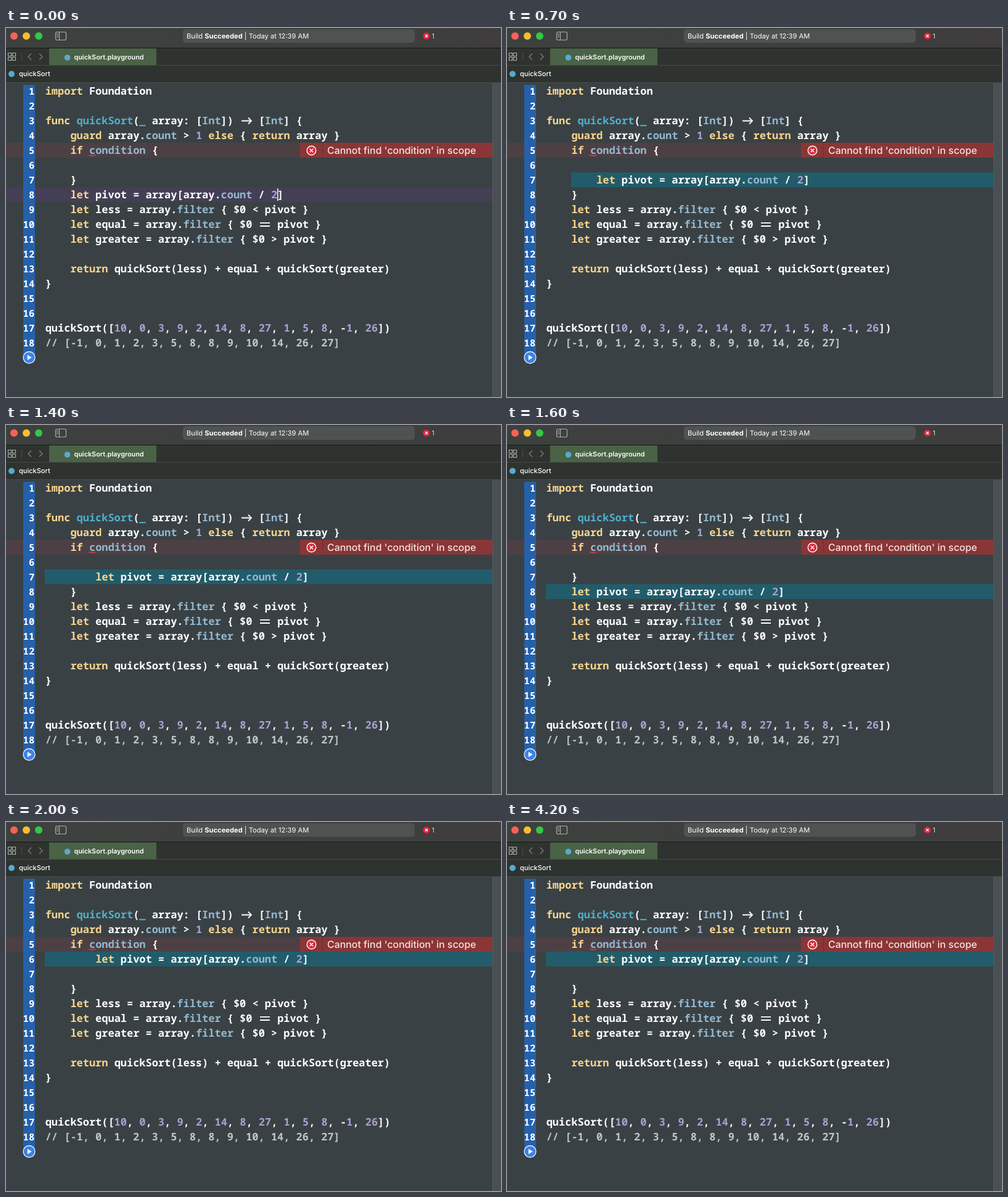
Animation, 803 px wide and 598 px high, one loop 4300 ms. Source, as an HTML page:

```html
<!DOCTYPE html>
<html lang="en">
<head>
<meta charset="utf-8">
<title>Moving a line of code</title>
<style>
  html, body { margin: 0; width: 100%; height: 100%; overflow: hidden; background: #3a4144; }
  svg { display: block; width: 803px; height: 598px; }
  text { fill: #fff; white-space: pre; text-rendering: geometricPrecision; font-family: Inter, sans-serif; }
  .code text { font: 600 16.97px "Noto Sans Mono", monospace; }
  .code .num { font-size: 15.5px; font-weight: 700; text-anchor: end; }
  .code .key { fill: #f8d58f; }
  .code .decl { fill: #4fb0cc; }
  .code .member { fill: #93b9d0; }
  .code .digit { fill: #a9a0d0; }
  .code .comment { fill: #bfc5c9; }
  .line { fill: none; stroke: #a9aca9; stroke-width: 1.2; }
</style>
</head>
<body>
<svg viewBox="0 0 803 598">
  <defs>
    <linearGradient id="bar">
      <stop offset="0" stop-color="#3d413e"/>
      <stop offset="1" stop-color="#3f3d3e"/>
    </linearGradient>
  </defs>

  <rect width="803" height="598" fill="#3a4144"/>
  <rect width="803" height="32" fill="url(#bar)"/>
  <rect y="32" width="803" height="1" fill="#151816"/>
  <rect y="33" width="803" height="55" fill="#2e332f"/>
  <rect y="60" width="803" height="1" fill="#454a46"/>
  <rect y="88" width="803" height="1" fill="#484e4b"/>
  <rect x="70" y="33" width="174" height="27" fill="#4a6245"/>

  <circle cx="13" cy="13" r="6" fill="#f8605a"/>
  <circle cx="33" cy="13" r="6" fill="#fabd2f"/>
  <circle cx="53" cy="13" r="6" fill="#33c748"/>
  <g class="line">
    <rect x="80.5" y="6.5" width="17" height="13" rx="2.5"/>
    <path d="M86.5 6.5v13M82 9.5h3M82 12h3M82 14.5h3"/>
    <path d="M3.5 40.5h5v5h-5zM10.5 40.5h5v5h-5zM3.5 47.5h5v5h-5zM10.5 47.5h5v5h-5z"/>
    <path d="M41 41.5l-5 5 5 5M54 41.5l5 5-5 5" stroke="#7d827e"/>
    <path d="M25.5 40v13" stroke="#484d49"/>
  </g>

  <rect x="287" y="2" width="376" height="22" rx="5" fill="#4e5251"/>
  <text x="293" y="17" font-size="11.17">Build <tspan font-weight="700">Succeeded</tspan> | Today at 12:39 AM</text>
  <circle cx="682" cy="13" r="5.6" fill="#e0263c"/>
  <path d="M680 11l4 4m0-4l-4 4" stroke="#fff" stroke-width="1.2"/>
  <text x="690.5" y="17" font-size="11" style="fill:#d6d7d6">1</text>

  <circle cx="99.5" cy="48" r="4.8" fill="#58a9d2"/>
  <text x="110.5" y="51" font-size="10.8" font-weight="600">quickSort.playground</text>
  <circle cx="9" cy="74.5" r="5" fill="#58a9d2"/>
  <text x="21" y="78" font-size="11" font-weight="500">quickSort</text>

  <rect id="current" y="258" width="789" height="24" fill="#443f55"/>
  <rect id="selection" height="24" fill="#225c6a"/>
  <rect y="186" width="477" height="24" fill="#4c4045"/>
  <rect x="477" y="186" width="312" height="24" fill="#8b3536"/>
  <path d="M513.5 186v24" stroke="#6b3033"/>
  <circle cx="495.5" cy="198.5" r="7.3" fill="#d92b3c" stroke="#fff" stroke-width="1.4"/>
  <path d="M492.8 195.8l5.4 5.4m0-5.4l-5.4 5.4" stroke="#fff" stroke-width="1.5"/>
  <text x="521" y="204" font-size="15.9" font-weight="500" style="fill:#f3e4e4">Cannot find 'condition' in scope</text>

  <rect x="789" y="89" width="14" height="509" fill="#495053"/>
  <path d="M789.5 89v509" stroke="#555c5f"/>
  <rect x="28" y="92" width="19" height="442" fill="#2561aa"/>
  <circle cx="37.5" cy="534" r="9.5" fill="#3b82e8" stroke="#e9f0f8" stroke-width="1.3"/>
  <path d="M34.8 529.8v8.4l7-4.2z" fill="#fff"/>

  <g class="code" id="code"></g>
  <path d="M135 206q5 2 10 0" fill="none" stroke="#e33b44" stroke-width="1.7" stroke-linecap="round"/>
  <path d="M382 150.5h16m-5-5l5 5-5 5M412 315.8h16m-16 5.2h16" fill="none" stroke="#fff" stroke-width="1.8"/>
  <rect id="caret" x="440" y="260" width="1.5" height="20" fill="#fff"/>
</svg>

<script>
const LEFT = 63.7, ADVANCE = 10.18, ROW = 24, LOOP = 4300;
const byId = id => document.getElementById(id);
const code = byId("code"), current = byId("current"), selection = byId("selection"), caret = byId("caret");

// Wide gaps leave room for the drawn ligatures.
const source = `import Foundation

func quickSort(_ array: [Int])    [Int] {
    guard array.count > 1 else { return array }
    if condition {



    let less = array.filter { $0 < pivot }
    let equal = array.filter { $0    pivot }
    let greater = array.filter { $0 > pivot }

    return quickSort(less) + equal + quickSort(greater)
}


quickSort([10, 0, 3, 9, 2, 14, 8, 27, 1, 5, 8, -1, 26])
// [-1, 0, 1, 2, 3, 5, 8, 8, 9, 10, 14, 26, 27]`.split("\n");

const tokens = [
  ["comment", "\\/\\/.*"],
  ["plain", "\\$0"],
  ["decl", "(?<=func )\\w+|\\b_"],
  ["key", "\\b(?:import|func|guard|else|return|if|let)\\b"],
  ["member", "\\b(?:Int|count|filter|condition)\\b"],
  ["digit", "\\b\\d+\\b"]
];
const pattern = new RegExp(tokens.map(([name, rule]) => `(?<${name}>${rule})`).join("|"), "g");

function svgNode(tag, className, content = "") {
  const el = document.createElementNS("http://www.w3.org/2000/svg", tag);
  el.setAttribute("class", className);
  el.textContent = content;
  return el;
}

function addText(el, x) {
  el.setAttribute("x", x);
  code.append(el);
  return el;
}

function highlight(line) {
  const el = svgNode("text", "");
  let last = 0;
  for (const match of line.matchAll(pattern)) {
    const name = Object.keys(match.groups).find(key => match.groups[key]);
    el.append(line.slice(last, match.index), svgNode("tspan", name, match[0]));
    last = match.index + match[0].length;
  }
  el.append(line.slice(last));
  return el;
}

const column = n => LEFT + n * ADVANCE;
const toRow = (el, row) => el.setAttribute("y", 107.7 + (row - 1) * ROW);

source.forEach((line, i) => {
  toRow(addText(svgNode("text", "num", i + 1), 46.2), i + 1);
  const body = line.trimStart();
  if (body) toRow(addText(highlight(body), column(line.length - body.length)), i + 1);
});
const pivot = addText(highlight("let pivot = array[array.count / 2]"), 0);
const brace = addText(highlight("}"), column(4));

// [start time, row of the pivot line, left edge of the selection]
const moves = [
  [0, 8, null], [700, 7, 104], [800, 6, 63], [1400, 7, 63],
  [1500, 8, 63], [1800, 7, 104], [1900, 6, 63]
];

function draw(now) {
  const t = now % LOOP;
  const [, row, left] = moves.findLast(([start]) => start <= t);
  const selected = left !== null;
  toRow(pivot, row);
  pivot.setAttribute("x", column(row === 8 ? 4 : 8));
  toRow(brace, row === 8 ? 7 : 8);

  selection.setAttribute("x", left ?? 0);
  selection.setAttribute("y", 90 + (row - 1) * ROW);
  selection.setAttribute("width", selected ? 789 - left : 0);
  current.setAttribute("opacity", selected ? 0 : 1);
  const blink = Math.min(1, Math.max(0, Math.abs(t - 350) / 150 - 0.5));
  caret.setAttribute("opacity", selected ? 0 : blink);
}

const begin = performance.now();
function tick() {
  draw(performance.now() - begin);
  requestAnimationFrame(tick);
}
tick();
</script>
</body>
</html>
```
